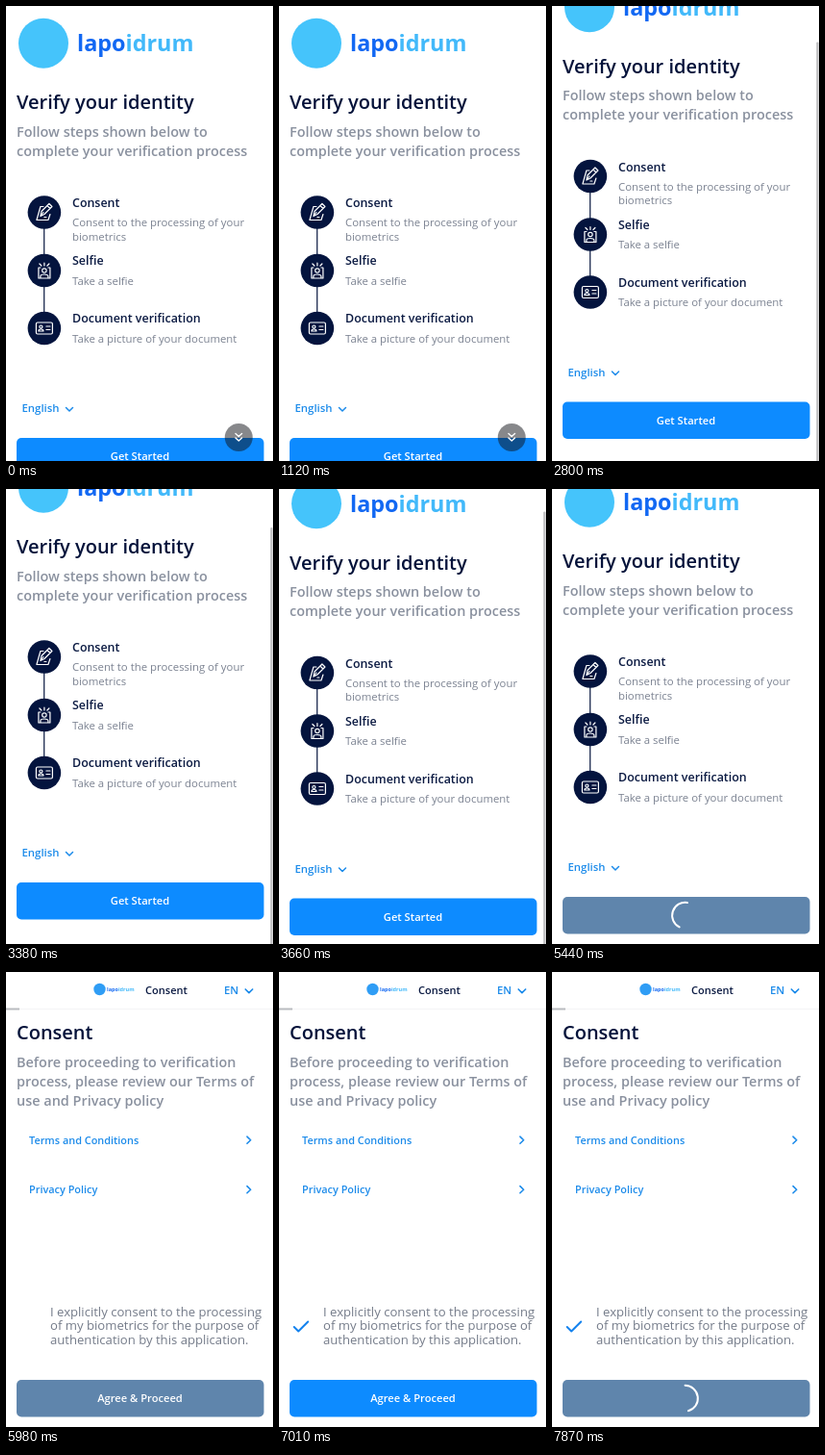
An HTML page that plays this animation: 278x473 px, repeating every 8 s.

```html
<!DOCTYPE html>
<html lang="en">
<head>
<meta charset="utf-8">
<title>Identity verification</title>
<style>
  html, body { margin: 0; width: 100%; height: 100%; overflow: hidden; background: #fff; }
  svg { display: block; width: 100vw; height: 100vh; }
  text { font-family: "Open Sans", "Noto Sans", sans-serif; white-space: pre; }
  .title { font-size: 20px; font-weight: 600; fill: #04123a; }
  .sub { font-size: 14.45px; font-weight: 600; fill: #8a919f; }
  .step { font-size: 12.45px; font-weight: 600; fill: #0b1a42; }
  .desc { font-size: 11.4px; fill: #7b8291; }
  .body { font-size: 13.12px; fill: #747b89; }
  .link { font-size: 10.9px; font-weight: 600; fill: #1c8bea; }
  .lang { font-size: 11.4px; font-weight: 600; fill: #1c8bea; }
  .head { font-size: 11.05px; font-weight: 600; fill: #0b1a42; }
  .btn { font-size: 11.15px; font-weight: 600; fill: #fff; text-anchor: middle; }
  .brand { font-weight: 700; fill: #1268f3; }
  .brand tspan { fill: #42b9fa; }
  .line { fill: none; stroke-linecap: round; stroke-linejoin: round; }
</style>
</head>
<body>
<svg id="stage" viewBox="0 0 278 473" preserveAspectRatio="none"></svg>
<script>
const LOOP = 8000;
const BLUE = [13, 139, 255], MUTED = [95, 133, 172];
const stage = document.getElementById('stage');

const text = (cls, x, y, ...lines) => lines.map((s, i) =>
  `<text class="${cls}" x="${x}" y="${y + i * (cls === 'sub' ? 20 : 14.5)}">${s}</text>`).join('');

const line = (d, color, width) =>
  `<path class="line" d="${d}" stroke="${color}" stroke-width="${width}"/>`;

const brand = (x, y, size) =>
  `<text class="brand" x="${x}" y="${y}" font-size="${size}">lapo<tspan>idrum</tspan></text>`;

const button = (id, y, label) => `
  <rect id="${id}Box" x="11" y="${y}" width="257.5" height="38.5" rx="5"/>
  <text id="${id}Label" class="btn" x="139.5" y="${y + 23}">${label}</text>
  <path id="${id}Spin" class="line" d="M0-13.5A13.5 13.5 0 0 1 3.5 13" stroke="#fff" stroke-width="2"/>`;

const icons = [
  'M-1-6H-4L-8 8H4L6 2 M-4 4L-3-1L5-9L8-6L0 2Z M3-7L6-4 M-4 4L-1 0 M0 5H2',
  'M-4-3H-6V8H6V-3H4 M-2.2 0A2.2 2.2 0 1 0 2.2 0A2.2 2.2 0 1 0-2.2 0 M-4 8V6Q-4 4 0 4T4 6V8 M0-8V-5 M-5-7L-3-5 M5-7L3-5',
  'M-7-6H7Q8.5-6 8.5-4.5V4.5Q8.5 6 7 6H-7Q-8.5 6-8.5 4.5V-4.5Q-8.5-6-7-6Z M-5-1.5A1.5 1.5 0 1 0-2-1.5A1.5 1.5 0 1 0-5-1.5 M-6 3Q-6 1-3.5 1T-1 3Z M2-2H6 M2 1.5H6'
];
const step = (y, i) => `<g transform="translate(39.9 ${y})">
  <circle r="17.3" fill="#04143e"/>${line(icons[i], '#fff', 1.2)}</g>`;

stage.innerHTML = `
  <rect width="278" height="473" fill="#fff"/>
  <g id="intro">
    <g id="sheet">
      <circle cx="39" cy="38.7" r="26" fill="#45c4fb"/>
      ${brand(74, 47, 23.4)}
      ${text('title', 11, 107, 'Verify your identity')}
      ${text('sub', 11, 135.8, 'Follow steps shown below to', 'complete your verification process')}
      ${line('M39.7 214V335', '#1b294f', 1.3)}
      ${[214.5, 275, 335].map(step).join('')}
      ${text('step', 69, 209, 'Consent')}
      ${text('desc', 69, 229, 'Consent to the processing of your', 'biometrics')}
      ${text('step', 69, 269, 'Selfie')}
      ${text('desc', 69, 289.5, 'Take a selfie')}
      ${text('step', 69, 329.3, 'Document verification')}
      ${text('desc', 69, 349.7, 'Take a picture of your document')}
      ${text('lang', 16.5, 422.3, 'English')}
      ${line('M62.5 417.5L66 421L69.5 417.5', '#1c8bea', 1.5)}
      ${button('start', 449, 'Get Started')}
    </g>
    <g id="more">
      <circle cx="242.3" cy="448.5" r="14.5" fill="#101218" opacity=".5"/>
      ${line('M239 444.5L242.3 447.5L245.6 444.5M239 449L242.3 452L245.6 449', '#fff', 1.4)}
    </g>
    <rect id="thumb" x="275.3" width="2.2" height="473" rx="1" fill="#bcbcbe"/>
  </g>
  <g id="consent">
    <circle cx="97.5" cy="18" r="6.2" fill="#2f9df5"/>
    ${brand(105, 20.3, 5.5)}
    ${text('head', 145, 22.5, 'Consent')}
    ${text('lang', 227, 22.5, 'EN')}
    ${line('M249.3 18L253 21.6L256.7 18', '#1c8bea', 1.7)}
    <rect y="38" width="278" height="1" fill="#f4f4f5"/>
    <rect y="37.5" width="14" height="2" fill="#b9bbc0"/>
    ${text('title', 11, 70, 'Consent')}
    ${text('sub', 11, 98.5, 'Before proceeding to verification', 'process, please review our Terms of', 'use and Privacy policy')}
    ${text('link', 24, 178.7, 'Terms and Conditions')}
    ${text('link', 24, 230.2, 'Privacy Policy')}
    ${[174.7, 226.2].map(y => line(`M251 ${y - 3.6}L254.7 ${y}L251 ${y + 3.6}`, '#1c8bea', 1.6)).join('')}
    <g id="tick">${line('M15.7 369L20.2 373.5L30.2 363.5', '#1583ee', 2)}</g>
    ${text('body', 46, 357.7, 'I explicitly consent to the processing', 'of my biometrics for the purpose of', 'authentication by this application.')}
    ${button('agree', 424, 'Agree &amp; Proceed')}
  </g>`;

const el = {};
stage.querySelectorAll('[id]').forEach(n => el[n.id] = n);

// Last value whose start time has passed.
const at = (t, keys) => keys.reduce((v, [from, value]) => t >= from ? value : v, keys[0][1]);
const show = (node, on) => node.setAttribute('visibility', on ? 'visible' : 'hidden');
const mix = k => `rgb(${MUTED.map((m, i) => Math.round(m + (BLUE[i] - m) * k))})`;

const scrollKeys = [[0, 0], [2800, 37.5], [2870, 38], [2940, 38.5], [3110, 39], [3380, 40],
  [3580, 32], [3660, 23.5], [3860, 24], [3930, 24.5], [4130, 25]];
const fadeKeys = [[0, 0], [5710, 0.4], [5780, 0.8], [5980, 1]];
const activeKeys = [[0, 0], [6810, 0.4], [6880, 0.8], [7010, 1], [7800, 0.3], [7870, 0]];

function setButton(id, y, active, busy, angle) {
  el[id + 'Box'].setAttribute('fill', mix(active));
  show(el[id + 'Label'], !busy);
  show(el[id + 'Spin'], busy);
  el[id + 'Spin'].setAttribute('transform', `translate(138.5 ${y}) rotate(${angle})`);
}

function render(t) {
  const scroll = at(t, scrollKeys);
  const fade = at(t, fadeKeys);
  const angle = (t - 7870) * 0.36;
  const leaving = t >= 5440;

  el.intro.setAttribute('display', fade ? 'none' : 'inline');
  el.consent.setAttribute('display', fade ? 'inline' : 'none');
  el.consent.setAttribute('opacity', fade);
  el.sheet.setAttribute('transform', `translate(0 ${-scroll})`);
  el.thumb.setAttribute('y', scroll);
  show(el.thumb, t >= 2800 && t < 4920);
  show(el.more, t < 2800);
  show(el.tick, t >= 6810);
  setButton('start', 468.2, leaving ? 0 : 1, leaving, angle);
  setButton('agree', 443.2, at(t, activeKeys), t >= 7800, angle);
}

const begin = performance.now();
function tick() {
  render((performance.now() - begin) % LOOP);
  requestAnimationFrame(tick);
}
tick();
</script>
</body>
</html>
```
